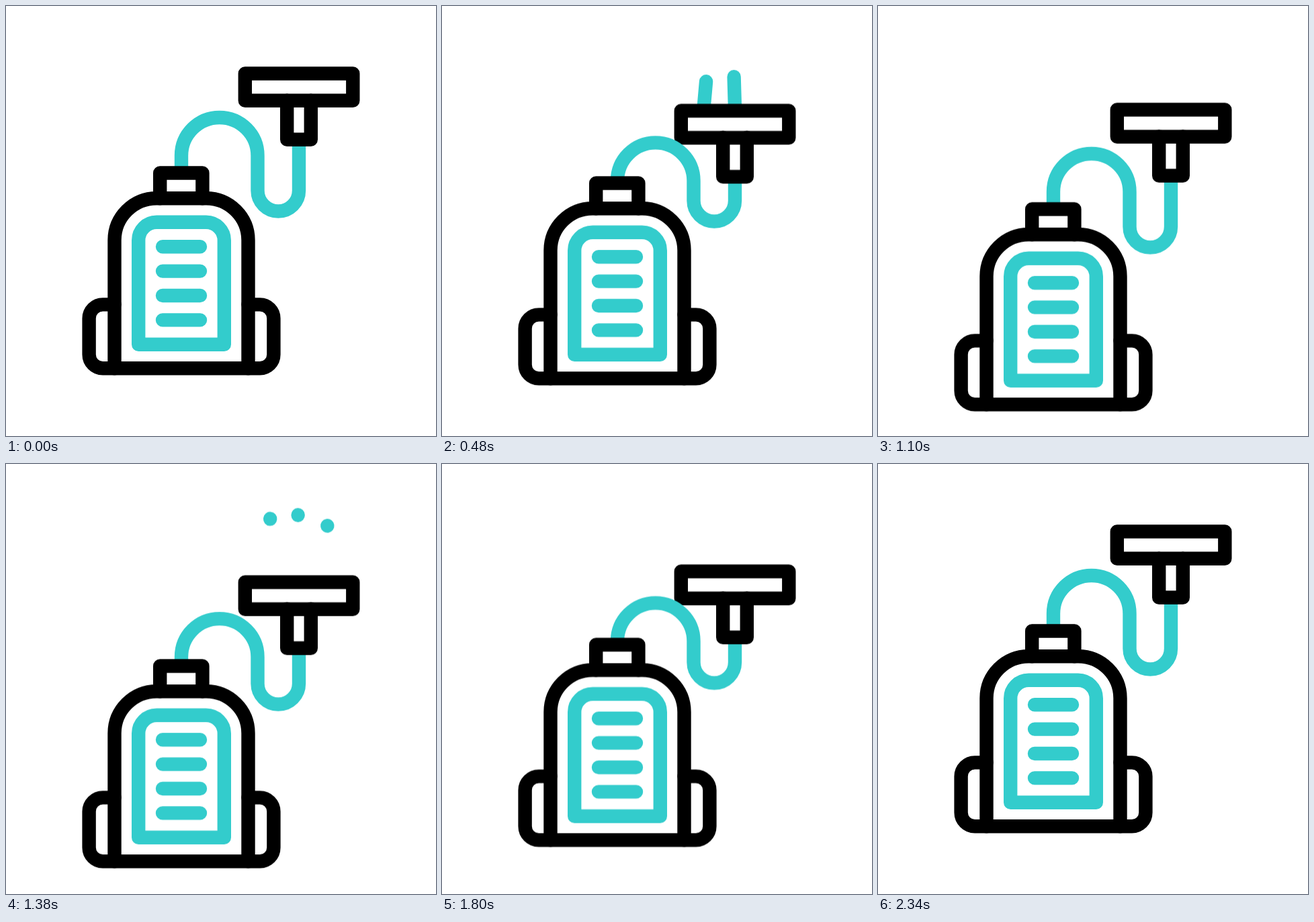
These frames come from a looping animation (640 by 640 pixels, 2400 ms). An HTML page without scripts:

```html
<!DOCTYPE html>
<html lang="en">
<head>
<meta charset="utf-8">
<title>Backpack vacuum</title>
<style>
  html, body { margin: 0; width: 100%; height: 100%; overflow: hidden; background: #fff; }
  svg { display: block; width: 100vw; height: 100vh; }

  .line { fill: none; stroke: #000; stroke-width: 20.4; stroke-linecap: round; stroke-linejoin: round; }
  .teal { stroke: #3cc; }
  .solid { fill: #fff; }

  .machine, .head, .hose, .dust, .streak {
    animation: 2.4s infinite cubic-bezier(.667, 0, .333, 1);
  }
  .machine { animation-name: sway; }
  .head { animation-name: sweep; }
  .hose { animation-name: bend; stroke-linecap: butt; }
  .dust { animation-name: fall, show; }
  .streak {
    animation-name: trail;
    animation-timing-function: linear;
    animation-delay: calc(var(--lead) * -1s);
    stroke-dasharray: .01 2;
  }

  @keyframes sway {
    0% { transform: translateY(0); animation-timing-function: cubic-bezier(.645, 0, .355, 1); }
    48.5% { transform: translateY(53.9px); }
    97.5%, 100% { transform: translateY(0); }
  }
  @keyframes sweep {
    0%, 46.25%, 90.83%, 100% { transform: translateY(0); }
    23.33% { transform: translateY(41px); }
    68.33% { transform: translateY(43.5px); }
  }
  /* The arch follows the head at about half its travel. */
  @keyframes bend {
    0%, 46.25%, 90.83%, 100% {
      d: path("M261 249V222.7A56.75 56.75 0 0 1 374.5 222.7V274.8A30.75 30.75 0 0 0 436 274.8V203");
    }
    23.33%, 68.33% {
      d: path("M261 249V245.5A56.75 56.75 0 0 1 374.5 245.5V274.8A30.75 30.75 0 0 0 436 274.8V245");
    }
  }

  /* Dust drops towards the nozzle; each streak grows, then shrinks in behind it. */
  @keyframes fall {
    0%, 9.17%, 55% { transform: translateY(-70px); }
    20%, 46%, 66.67%, 100% { transform: translateY(0); }
  }
  @keyframes show {
    0%, 9.1%, 25.1%, 54.9%, 75.1%, 100% { visibility: hidden; }
    9.17%, 25%, 55%, 75% { visibility: visible; }
  }
  @keyframes trail {
    0%, 13.33%, 46%, 64.17%, 100% { stroke-dasharray: .01 2; stroke-dashoffset: 0; }
    20%, 23.33%, 70.83%, 72.5% { stroke-dasharray: 1 2; stroke-dashoffset: 0; }
    25%, 45.9%, 75%, 99.9% { stroke-dasharray: .01 2; stroke-dashoffset: -.99; }
  }
</style>
</head>
<body>
<svg viewBox="0 0 640 640">
  <g class="machine">
    <g class="dust">
      <path class="line teal streak" style="--lead:.08" pathLength="1" d="M393.2 95.8L388.4 150"/>
      <path class="line teal streak" style="--lead:0" pathLength="1" d="M434.6 90.2L436.3 148"/>
      <path class="line teal streak" style="--lead:.12" pathLength="1" d="M478.3 106.2L484.6 146"/>
    </g>
    <path class="head line solid" d="M355.8 100.5H516.3V140.7H355.8Z"/>
    <path class="hose line teal" d="M261 249V222.7A56.75 56.75 0 0 1 374.5 222.7V274.8A30.75 30.75 0 0 0 436 274.8V203"/>
    <path class="head line" d="M418.2 140.7V198.7H453.8V140.7"/>
    <path class="line" d="M229.2 286.2V248.5H292.4V286.2"/>
    <path class="line" d="M161.5 539.3V348.7A62.5 62.5 0 0 1 224 286.2H298A62.5 62.5 0 0 1 360.5 348.7V539.3"/>
    <path class="line" d="M161.5 444.4H144.1A20.5 20.5 0 0 0 123.6 464.9V518.8A20.5 20.5 0 0 0 144.1 539.3H377.9A20.5 20.5 0 0 0 398.4 518.8V464.9A20.5 20.5 0 0 0 377.9 444.4H360.5"/>
    <path class="line teal" d="M197.2 503.8V348.8A27 27 0 0 1 224.2 321.8H297.8A27 27 0 0 1 324.8 348.8V503.8Z"/>
    <path class="line teal" d="M233 358.2H289M233 394.6H289M233 431H289M233 467.4H289"/>
  </g>
</svg>
</body>
</html>
```
